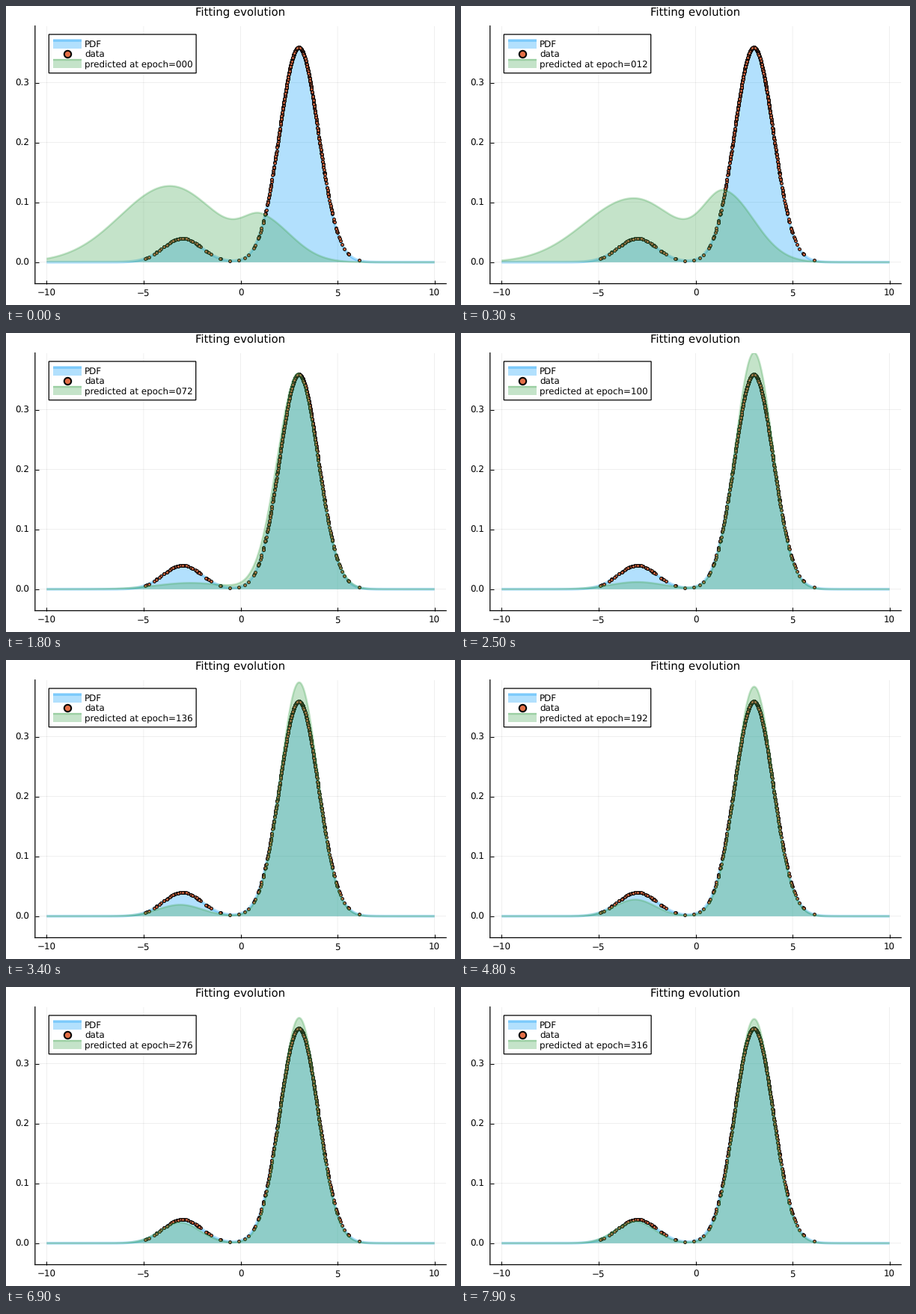
These frames come from a looping animation (600 by 400 pixels, 8000 ms). A matplotlib script:

```python
import numpy as np
import matplotlib.pyplot as plt
from matplotlib.animation import FuncAnimation
from matplotlib.patches import Rectangle
from matplotlib.textpath import TextPath

plt.rcParams.update({"font.family": "DejaVu Sans", "text.hinting": "none"})

W, H, DPI = 600, 400, 100
PX = 72 / DPI                      # one pixel in points
FRAMES, STEP_MS, EPOCHS = 80, 100, 4
LEFT, RIGHT, TOP, BOTTOM = 38.8, 588.2, 26.7, 371.5
BLUE, ORANGE, GREEN = "#009af9", "#e36f47", "#3ea44e"
SMALL, LARGE = 11.86, 14.83        # text heights in pixels
THIN = 1.25                        # axis and frame lines in pixels
BLUE_W, GREEN_W = 3 * THIN, 2 * THIN
HALF_MASS = np.sqrt(np.pi / 2)     # area of half a unit bell


def fade(t, tau, power):
    """Falls from 1 to 0 around tau."""
    return np.exp(-(t / tau) ** power)


def bump(t, centre, width):
    return np.exp(-((t - centre) / width) ** 2)


def bell(x, height, centre, left, right):
    spread = np.where(x < centre, left, right)
    return height * np.exp(-((x - centre) / spread) ** 2 / 2)


def pdf(x):
    peak = 1 / np.sqrt(2 * np.pi)
    return bell(x, .1 * peak, -3, 1, 1) + bell(x, .9 * peak, 3, 1, 1)


def predicted(x, t):
    """The minor hump shrinks and regrows; the major one holds the remaining mass."""
    regrown = 1 - np.exp(-max(t - 17.5, 0) / 25.6)
    height = .1275 * fade(t, 9.6, 1.5) + .04 * regrown
    centre = -3.12 - .67 * fade(t, 4, 2) + .85 * bump(t, 12, 9)
    left = 1.02 + 1.55 * fade(t, 21, 2)
    right = 1.02 + 1.5 * fade(t, 21, 2) - .7 * bump(t, 8, 5)
    minor = bell(x, height, centre, left, right)

    mass = 1 - height * HALF_MASS * (left + right)
    centre = 3.02 - 1.85 * fade(t, 7.9, 1.55)
    left = .965 + .5 * bump(t, 10, 6.5)
    right = .965 + .55 * fade(t, 15, 4)
    return minor + bell(x, mass / HALF_MASS / (left + right), centre, left, right)


def sample_normal(rng, n, mean):
    """Normal draws as shuffled, jittered quantiles."""
    grid = np.linspace(-4, 4, 2001)
    cdf = np.cumsum(np.exp(-grid ** 2 / 2))
    p = (np.arange(n) + .5 + rng.uniform(-1.5, 1.5, n)) / n
    return mean + np.interp(np.clip(p, .4 / n, 1 - .4 / n), cdf / cdf[-1], grid)


rng = np.random.default_rng(4)
data = np.concatenate([sample_normal(rng, 55, -3), sample_normal(rng, 445, 3)])
rng.shuffle(data)

fig = plt.figure(figsize=(W / DPI, H / DPI), dpi=DPI, facecolor="white")
ax = fig.add_axes([LEFT / W, 1 - BOTTOM / H, (RIGHT - LEFT) / W, (BOTTOM - TOP) / H])
page = fig.add_axes([0, 0, 1, 1], zorder=2)
page.set(xlim=(0, W), ylim=(H, 0))
page.axis("off")

# Axes
xticks, yticks = [-10, -5, 0, 5, 10], [0, .1, .2, .3]
y_max = pdf(3.0)
ax.set(xlim=(-10.6, 10.6), ylim=(-.1 * y_max, 1.1 * y_max), xticks=xticks, yticks=yticks)
ax.set_axisbelow(True)
ax.grid(color="black", alpha=.1, lw=THIN / 2 * PX, snap=False)
ax.tick_params(direction="in", length=5 * PX, width=PX, labelleft=False, labelbottom=False)
for side, spine in ax.spines.items():
    spine.set_visible(side in ("left", "bottom"))
    spine.set(linewidth=THIN * PX, zorder=.6, snap=False)


def label(x, y, text, size=SMALL, ha="left"):
    return page.text(x, y, text, fontsize=size * PX, ha=ha, va="baseline", color="black")


label((LEFT + RIGHT) / 2, 13, "Fitting evolution", LARGE, "center")
for v in xticks:
    px = LEFT + (v + 10.6) / 21.2 * (RIGHT - LEFT)
    label(px, 388, str(v).replace("-", "\u2212"), ha="center")
for v in yticks:
    py = BOTTOM - (v / y_max + .1) / 1.2 * (BOTTOM - TOP)
    label(31, round(py + 4.3), f"{v:.1f}", ha="right")


# Curves
def outline(x, y):
    return np.column_stack([np.r_[x[0], x, x[-1]], np.r_[0, y, 0]])


def area(x, y, color, width, z):
    fill, = ax.fill(*outline(x, y).T, color=color, alpha=.3, lw=0, zorder=z)
    line, = ax.plot(x, y, color=color, alpha=.3, lw=width * PX, zorder=z + .1,
                    solid_joinstyle="round", solid_capstyle="butt")
    return fill, line


def dots(axes, x, y, size, edge, z):
    axes.plot(x, y, "o", ms=size * PX, mew=edge * PX, mfc=ORANGE, mec="black", zorder=z)


xs = np.linspace(-10, 10, 501)
area(xs, pdf(xs), BLUE, BLUE_W, 3)
dots(ax, data, pdf(data), 3.8, 1, 4)
fill, line = area(xs, predicted(xs, 0), GREEN, GREEN_W, 5)

# Legend
BOX_X, TEXT_X = 57.3, 105
box = page.add_patch(Rectangle((BOX_X, 38), 197, 51.7, fc="white", ec="black",
                               lw=THIN * PX, snap=False))


def swatch(y, color, width):
    x0, x1 = 62.8, 100.6
    page.add_patch(Rectangle((x0, y), x1 - x0, 12, fc=color, alpha=.3, lw=0, zorder=2))
    page.plot([x0, x1], [y + .5] * 2, color=color, alpha=.3, lw=width * PX,
              solid_capstyle="butt", zorder=3)


swatch(45.2, BLUE, BLUE_W)
swatch(71.4, GREEN, GREEN_W)
dots(page, [81.6], [64], 9.4, 2, 3)
label(TEXT_X, 55, "PDF")
label(TEXT_X, 68, "data")
caption = label(TEXT_X, 81, "")


def update(i):
    y = predicted(xs, i)
    fill.set_xy(outline(xs, y))
    line.set_ydata(y)
    text = f"predicted at epoch={i * EPOCHS:03d}"
    caption.set_text(text)
    ink = TextPath((0, 0), text, size=SMALL).get_extents().x1
    box.set_width(TEXT_X + ink + 5.5 - BOX_X)
    return fill, line, caption, box


anim = FuncAnimation(fig, update, frames=FRAMES, interval=STEP_MS,
                     repeat=True, repeat_delay=0, blit=False)
plt.show()
```
